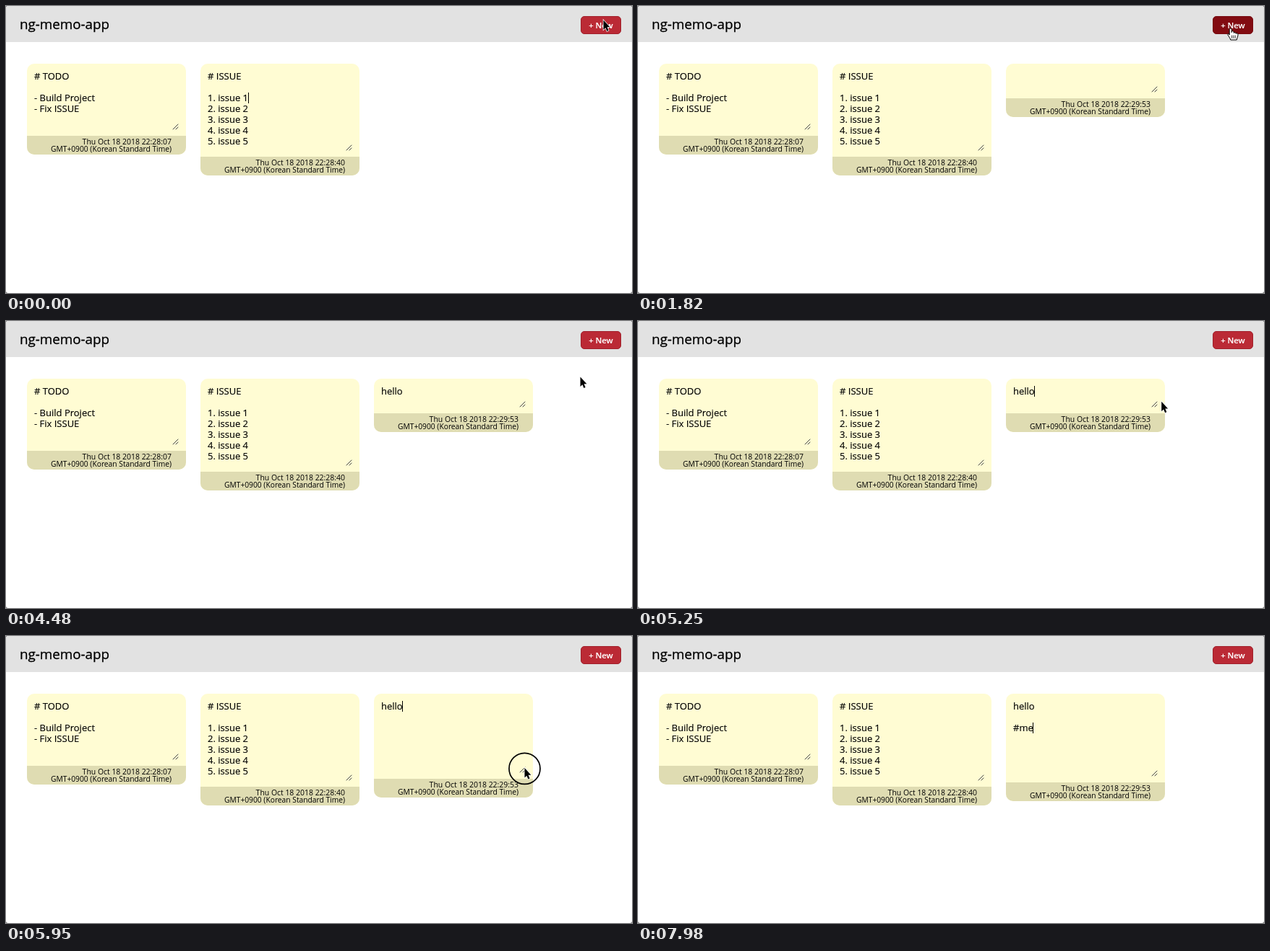
An HTML page that plays this animation: 866 px wide and 398 px high, repeating every 8 s.

```html
<!DOCTYPE html>
<html lang="en">
<head>
<meta charset="utf-8">
<title>ng-memo-app</title>
<style>
  html, body { margin: 0; width: 100%; height: 100%; overflow: hidden; background: #777; }
  svg { display: block; width: 866px; height: 398px; }
  text { font: 13px "Open Sans", "Noto Sans", sans-serif; white-space: pre; stroke: #000; stroke-width: .15px; }
  .title { font-size: 18.75px; stroke-width: .3px; }
  .button { font-size: 11.2px; font-weight: 600; fill: #fff; stroke: #fff; text-anchor: middle; }
  .date { font-size: 10.45px; text-anchor: end; stroke: none; }
  .zone { font-size: 10.25px; text-anchor: end; stroke: none; }
  .line { fill: none; stroke: #000; stroke-linecap: round; stroke-linejoin: round; }
</style>
</head>
<body>
<svg id="stage" viewBox="0 0 866 398"></svg>
<script>
const LOOP = 8000, STEP = 70;
const CARD_TOP = 80, CARD_WIDTH = 220, LINE = 15, FOOTER = 26;
const DRAG_START = 5510, DRAG_END = 6030;
const stage = document.getElementById('stage');
const ruler = document.createElement('canvas').getContext('2d');

const ramp = (t, from, to) => Math.min(1, Math.max(0, (t - from) / (to - from)));
const smooth = p => p * p * (3 - 2 * p);
const mix = (a, b, p) => a + (b - a) * p;
const within = (t, ...spans) => spans.some(([from, to]) => t >= from && t < to);

// Pointer stops: time, x, y
const stops = [
  [0, 826, 19], [350, 823, 27], [490, 823, 27], [560, 820, 32],
  [1820, 820, 32], [2310, 653, 116], [4200, 653, 116], [4480, 794, 77],
  [4700, 800, 70], [4970, 790, 78], [5320, 716, 115]
];

// Typed keys: time, character
const keys = [
  [3150, 'h'], [3220, 'e'], [3430, 'l'], [3570, 'l'], [3780, 'o'],
  [6580, '\n'], [6790, '\n'], [7280, '#'], [7560, 'm'], [7840, 'e']
];

const clicks = [
  { down: 1050, up: 1190, x: 820.5, y: 30 },
  { down: 5390, up: DRAG_END }
];

const dragged = t => smooth(ramp(t, DRAG_START, DRAG_END));

function pointerAt(t) {
  if (t >= DRAG_START) return [mix(716, 717, dragged(t)), mix(115, 187, dragged(t))];
  const next = stops.findIndex(s => s[0] > t);
  if (next < 0) return stops[stops.length - 1].slice(1);
  const a = stops[next - 1], b = stops[next];
  const p = smooth(ramp(t, a[0], b[0]));
  return [mix(a[1], b[1], p), mix(a[2], b[2], p)];
}

function caret(x, lines, row) {
  ruler.font = '13px "Open Sans", "Noto Sans", sans-serif';
  const left = Math.floor(x + 10 + ruler.measureText(lines[row]).width);
  return `<rect x="${left}" y="${CARD_TOP + 10 + row * LINE}" width="1" height="15"/>`;
}

function card(x, top, lines, time) {
  const footerY = Math.round(top);
  const text = lines.map((s, i) =>
    `<text x="${x + 10}" y="${102 + i * LINE}">${s}</text>`).join('');
  return `
    <rect x="${x}" y="${CARD_TOP}" width="${CARD_WIDTH}" height="${footerY + FOOTER - CARD_TOP}" rx="10" fill="#fffcd3"/>
    <path d="M${x} ${footerY}h220v16a10 10 0 0 1-10 10h-200a10 10 0 0 1-10-10z" fill="#dfdcb2"/>
    <path class="line" d="M${x + 202} ${footerY - 9}l7-7m-3 7l3-3" stroke-width=".9" style="stroke:#333"/>
    ${text}
    <text class="date" x="${x + 200}" y="${footerY + 11.5}">Thu Oct 18 2018 ${time}</text>
    <text class="zone" x="${x + 200}" y="${footerY + 22.3}">GMT+0900 (Korean Standard Time)</text>`;
}

function header(t) {
  const hover = ramp(t, 70, 280) * (1 - ramp(t, 1890, 2100));
  const blend = (from, to) => `rgb(${from.map((v, i) => Math.round(mix(v, to[i], hover)))})`;
  const face = blend([187, 42, 53], [130, 11, 17]);
  const edge = blend([160, 32, 43], [118, 10, 16]);
  return `
    <rect width="866" height="398" rx="3" fill="#fff"/>
    <path d="M0 50V3a3 3 0 0 1 3-3h860a3 3 0 0 1 3 3v47z" fill="#e2e2e2"/>
    <text class="title" x="19" y="32">ng-memo-app</text>
    <rect x="795.5" y="14.5" width="55" height="24" rx="4.5" fill="${face}" stroke="${edge}"/>
    <text class="button" x="823" y="30.5">+ New</text>`;
}

function memos(t) {
  const todo = ['# TODO', '', '- Build Project', '- Fix ISSUE'];
  const issues = ['# ISSUE', '', ...[1, 2, 3, 4, 5].map(n => `${n}. issue ${n}`)];
  let out = card(29, 180, todo, '22:28:07') + card(269, 209, issues, '22:28:40');
  if (within(t, [0, 270], [770, 1050])) out += caret(269, issues, 2);
  if (t < 1540) return out;

  const typed = keys.filter(k => k[0] <= t);
  const lines = typed.map(k => k[1]).join('').split('\n');
  out += card(509, mix(128, 203, dragged(t)), lines, '22:29:53');
  const lit = typed.length
    ? (t - typed[typed.length - 1][0]) % 1000 < 500
    : within(t, [1540, 1680], [2180, 2680]);
  return lit ? out + caret(509, lines, lines.length - 1) : out;
}

function ring(t) {
  return clicks.filter(c => within(t, [c.down, c.up + 120])).map(c => {
    const [px, py] = pointerAt(t);
    const r = mix(21.5, 34, smooth(ramp(t, c.up, c.up + 105)));
    return `<circle class="line" cx="${c.x || px + .5}" cy="${c.y || py + 1.5}" r="${r}" stroke-width="1.7"/>`;
  }).join('');
}

const shapes = {
  arrow: `<path d="M.5 .5V14L3.4 11.3L5.4 16L7.6 15L5.6 10.3H9.4Z" stroke="#fff" stroke-width="1.4" paint-order="stroke"/>`,
  hand: `<path d="M-1.8 8V.6C-1.8-1.4 1.2-1.4 1.2 .6V4.6C2-.0 4.6 4 4.3 5.4C5.2 4 7 4.6 7 6.2C8.4 5.2 10 6 10 7.6C10 11 8.6 12 8.2 15H-.2C-.8 12-3.4 10-4.2 7.6C-4.5 6-2.8 6-1.8 8Z" fill="#fff" stroke="#000"/>
    <path class="line" d="M1.6 9v3.5m2.3-3.5v3.5m2.3-3.5v3.5" stroke-width=".8"/>`,
  beam: ['#fff', '#000'].map((color, i) =>
    `<path class="line" d="M-2.5-7.5Q0-7.5 .5-6Q1-7.5 3.5-7.5M.5-6V6M-2.5 7.5Q0 7.5 .5 6Q1 7.5 3.5 7.5M-1.5 2.5H2.5" style="stroke:${color}" stroke-width="${i ? 1.3 : 3}"/>`).join('')
};

function pointer(t) {
  if (within(t, [3150, 4200], [6580, LOOP])) return '';
  const [x, y] = pointerAt(t);
  const onButton = x > 795 && y < 39 && t >= 140;
  const onText = x > 509 && x < 708 && y > CARD_TOP;
  const kind = onButton ? 'hand' : onText ? 'beam' : 'arrow';
  return `<g transform="translate(${x} ${y})">${shapes[kind]}</g>`;
}

function draw(now) {
  const t = Math.floor(now % LOOP / STEP) * STEP;
  stage.innerHTML = header(t) + memos(t) + ring(t) + pointer(t);
  requestAnimationFrame(draw);
}
draw(performance.now());
</script>
</body>
</html>
```
